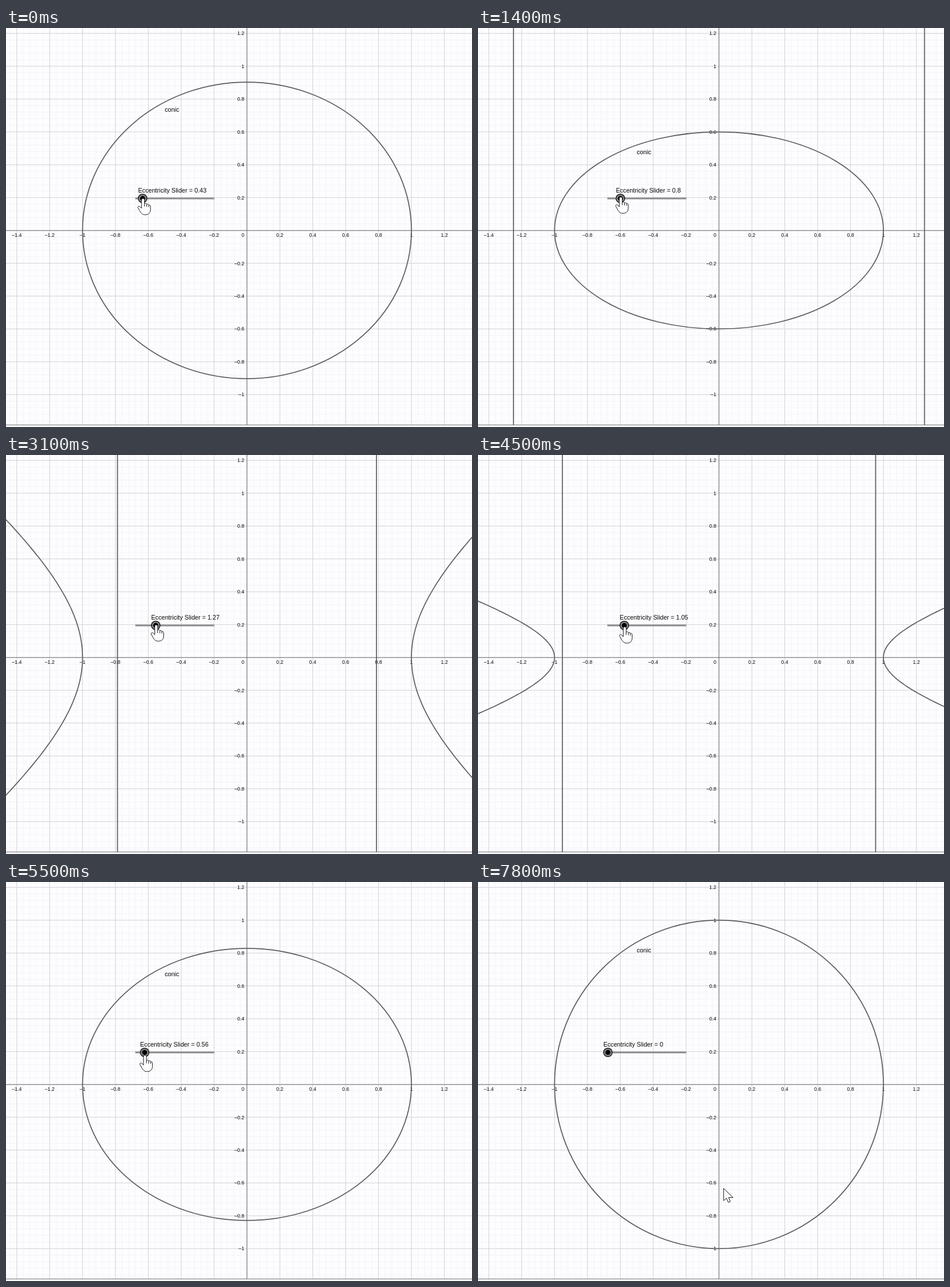
Recreate the animation shown at these times as an HTML page with a canvas. Size 800 by 686 pixels, loop 8 s.

```html
<!DOCTYPE html>
<html lang="en">
<head>
<meta charset="utf-8">
<title>Conic and eccentricity</title>
<style>
html, body { margin: 0; width: 100%; height: 100%; overflow: hidden; background: #fdfcfe; }
canvas { display: block; }
</style>
</head>
<body>
<canvas id="stage" width="800" height="686"></canvas>
<script>
const ctx = document.getElementById('stage').getContext('2d');
const LOOP = 8000, STEP = 100;
const OX = 413.7, OY = 348, UNIT = 282.3, FLOOR = 682.5;
const TRACK_Y = 293, SLIDER_X = 223, SLIDER_UNIT = 26.8;
const INK = '#5c5c5e', AXIS = '#747476';
const FONT = '"Liberation Sans", Arial, sans-serif';

// Key points of the drag: time and slider value; below zero the knob stops but the hand goes on.
const drag = [
  [0, 0.43], [400, 0.43], [600, 0.5], [800, 0.5], [1200, 0.65], [1400, 0.8],
  [1700, 0.9], [1800, 0.9], [2200, 1.1], [2400, 1.1], [2700, 1.25], [3000, 1.25],
  [3400, 1.35], [3900, 1.35], [4500, 1.05], [5100, 0.8], [6000, 0.25], [6600, 0], [7500, -0.3]
];
const handHeight = [[0, 293], [1400, 290.5], [3100, 292], [6000, 299]];

const px = x => OX + x * UNIT;
const py = y => OY - y * UNIT;

function interpolate(points, t) {
  const i = points.findIndex(p => p[0] > t);
  if (i < 0) return points[points.length - 1][1];
  const [t0, v0] = points[i - 1], [t1, v1] = points[i];
  return v0 + (v1 - v0) * (t - t0) / (t1 - t0);
}

function line(x1, y1, x2, y2, color, width) {
  ctx.beginPath();
  ctx.moveTo(x1, y1);
  ctx.lineTo(x2, y2);
  ctx.strokeStyle = color;
  ctx.lineWidth = width;
  ctx.stroke();
}

function text(str, x, y, size, align = 'left') {
  ctx.font = `${size}px ${FONT}`;
  ctx.textAlign = align;
  ctx.fillStyle = '#080808';
  ctx.fillText(str, x, y);
}

function gridLines(gap, color) {
  for (let i = -40; i <= 40; i++) {
    const x = px(i * gap), y = py(i * gap);
    line(x, 0, x, FLOOR, color, 1);
    if (y < FLOOR) line(0, y, 800, y, color, 1);
  }
}

function drawGrid() {
  ctx.fillStyle = '#fdfcfe';
  ctx.fillRect(0, 0, 800, 686);
  gridLines(0.04, '#f5f3f6');
  gridLines(0.2, '#d4d3d6');
  line(0, 348.3, 800, 348.3, AXIS, 1.1);
  line(413.6, 0, 413.6, FLOOR, AXIS, 1.1);
  line(0, FLOOR, 800, FLOOR, AXIS, 1.2);
}

function drawAxisLabels() {
  text('0', 409, 358.6, 8.7, 'right');
  for (let i = -7; i <= 6; i++) {
    if (i === 0) continue;
    const label = (i < 0 ? '–' : '') + Math.abs(i) / 5;
    text(label, px(i / 5), 358.6, 8.7, 'center');
    if (i >= -5) text(label, 409, py(i / 5) + 3.1, 8.7, 'right');
  }
}

function drawConic(e) {
  const b = Math.sqrt(Math.abs(1 - e * e));
  ctx.strokeStyle = INK;
  ctx.lineWidth = 1.7;
  ctx.beginPath();
  if (e < 1) {
    ctx.ellipse(OX, OY, UNIT, b * UNIT, 0, 0, 2 * Math.PI);
  } else {
    for (const side of [-1, 1]) {
      ctx.moveTo(px(side * Math.cosh(1.2)), py(b * Math.sinh(-1.2)));
      for (let u = -1.2; u <= 1.2; u += 0.02) {
        ctx.lineTo(px(side * Math.cosh(u)), py(b * Math.sinh(u)));
      }
    }
  }
  ctx.stroke();
  if (e > 0) {
    for (const x of [px(-1 / e), px(1 / e)]) line(x, 0, x, FLOOR, INK, 1.7);
  }
  if (e < 1) text('conic', 272.4, 121 + 238.75 * (1 - b), 10.7);
}

function disc(x, y, r, color) {
  ctx.beginPath();
  ctx.arc(x, y, r, 0, 2 * Math.PI);
  ctx.fillStyle = color;
  ctx.fill();
}

function drawSlider(e) {
  const x = SLIDER_X + e * SLIDER_UNIT;
  line(222, TRACK_Y, 357.5, TRACK_Y, '#8c8b8d', 3);
  disc(x, TRACK_Y, 8.1, '#111');
  disc(x, TRACK_Y, 6.8, '#858486');
  disc(x, TRACK_Y, 4.3, '#000');
  text('Eccentricity Slider = ' + e, x - 7.8, 283.2, 10.65);
}

const hand = new Path2D(
  'M-2.5 2.5Q-2.5 0 0 0Q2.5 0 2.5 2.5V9.5C3 7.8 6.3 8.2 6.3 10.5' +
  'C7 9 9.8 9.6 9.8 11.8C10.5 10.6 12.8 11.4 12.8 13.5V19' +
  'C12.8 24.5 9.5 28 4.5 28H3C-1 28 -3.5 25.5 -5.5 21.5L-8.6 16' +
  'C-9.6 13.8 -7 12.4 -5 14.2L-2.5 17Z');
const knuckles = new Path2D('M2.5 9V14M6.3 10.5V14.5M9.8 11.8V15');
const arrow = new Path2D('M0 0V21L4.8 16.8L8 24L11.5 22.5L8.5 15.7H16Z');

function drawCursor(shape, x, y, detail) {
  ctx.save();
  ctx.translate(x, y);
  ctx.fillStyle = '#fff';
  ctx.fill(shape);
  ctx.strokeStyle = '#1a1a1a';
  ctx.lineWidth = 1;
  ctx.lineJoin = 'round';
  ctx.stroke(shape);
  if (detail) ctx.stroke(detail);
  ctx.restore();
}

function frame(now) {
  const t = Math.floor(now % LOOP / STEP) * STEP;
  const value = interpolate(drag, t);
  const e = Math.max(0, Math.round(value * 100) / 100);
  drawGrid();
  drawAxisLabels();
  drawConic(e);
  drawSlider(e);
  if (t < 7700) {
    drawCursor(hand, SLIDER_X + value * SLIDER_UNIT + 0.7, interpolate(handHeight, t), knuckles);
  } else {
    const arrived = t >= 7800;
    drawCursor(arrow, arrived ? 421.7 : 300, arrived ? 526.8 : 400);
  }
  requestAnimationFrame(frame);
}
requestAnimationFrame(frame);
</script>
</body>
</html>
```
